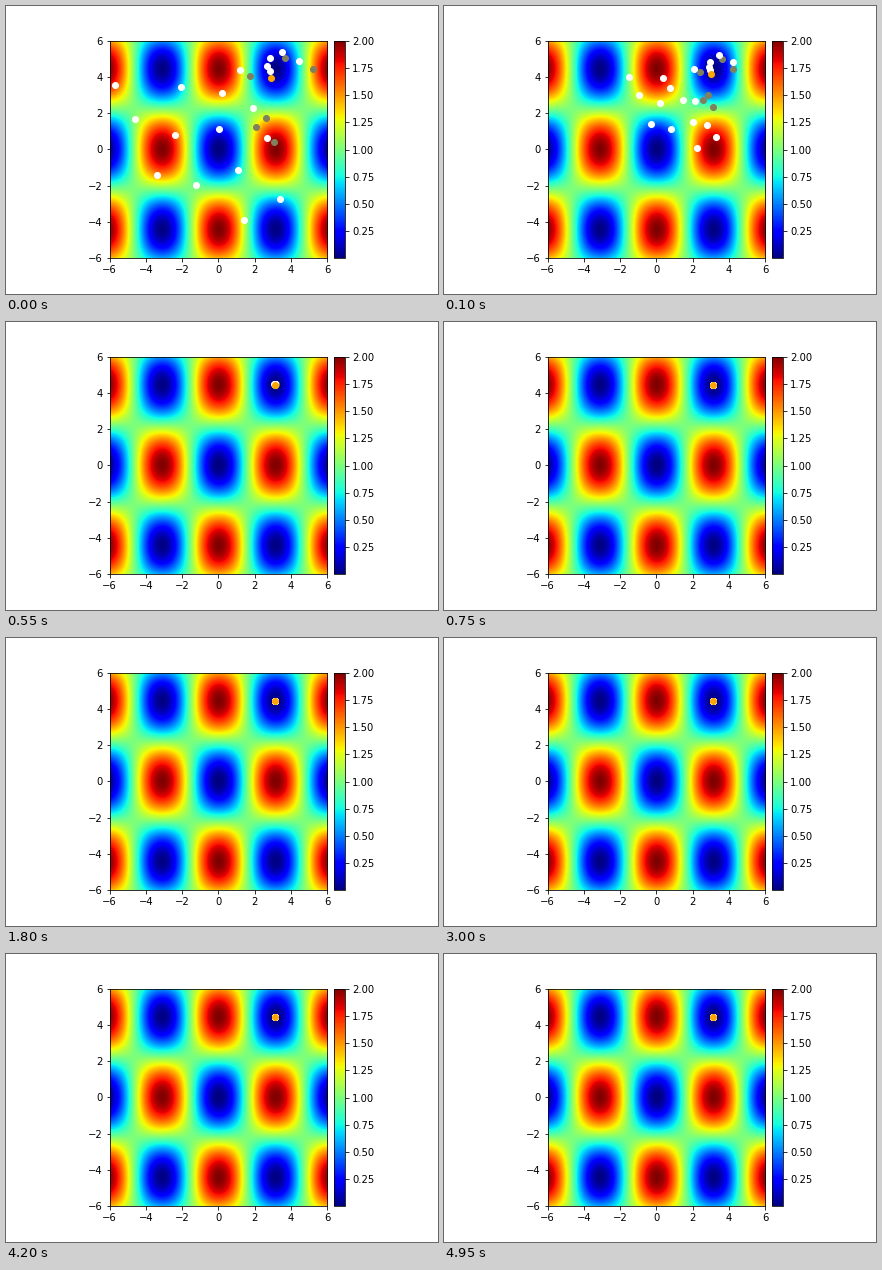
Animation of 432x288 px, one loop 5000 ms. Source, as a matplotlib script:

```python
import numpy as np
import matplotlib.pyplot as plt
from matplotlib.animation import FuncAnimation

W, H, DPI = 432, 288, 72
FRAMES, STEP, SETTLED = 100, 50, 15
SIDE, LEFT, BOTTOM = 217.44, 103.64, 36.0
BAR, GAP = 0.05 * SIDE, 7.2
GOAL = np.array([np.pi, np.pi * np.sqrt(2)])

plt.rcParams.update({"font.family": "DejaVu Sans", "font.size": 10})


def griewank(x, y):
    return 1 + (x**2 + y**2) / 4000 - np.cos(x) * np.cos(y / np.sqrt(2))


def panel(left, width):
    return fig.add_axes([left / W, BOTTOM / H, width / W, SIDE / H])


def polar(r, degrees):
    """Offsets from the goal."""
    a = np.radians(degrees)
    return np.column_stack([r * np.cos(a), r * np.sin(a)])


def spans(n, lingering, slow):
    """Steps each dot takes to close in; a few take longer."""
    s = np.full(n, 2.5)
    s[lingering] = slow
    return s


def agent_starts(n=19, near=5):
    """A tight ring at the goal, then a fan towards the lower left."""
    i = np.arange(n)
    t = i / (n - 1)
    r = 0.33 + 8.5 * t**2 * (3 - 2 * t)
    fan = 180 + 95 * ((0.618 * i - 0.06) % 1)
    return polar(r, np.where(i < near, 215 - 50 * i, fan))


def scout_starts():
    angles = [50, 195, 0, 259, 252, 269]
    return polar(0.8 + 0.65 * np.arange(len(angles)), angles)


fig = plt.figure(figsize=(W / DPI, H / DPI), dpi=DPI, facecolor="white")
ax = panel(LEFT, SIDE)
grid = np.linspace(-6, 6, 200)
field = ax.imshow(griewank(*np.meshgrid(grid, grid)), cmap="jet",
                  origin="lower", extent=(-6, 6, -6, 6), aspect="auto",
                  interpolation="bilinear")
ax.set(xlim=(-6, 6), ylim=(-6, 6),
       xticks=range(-6, 7, 2), yticks=range(-6, 7, 2))
fig.colorbar(field, cax=panel(LEFT + SIDE + GAP, BAR),
             ticks=np.arange(0.25, 2.01, 0.25), format="%.2f")

# start offsets, closing spans, drift off the goal until settled, colour
swarm = [
    (scout_starts(), spans(6, [0], 7), (0, 0), "#80805f"),
    (agent_starts(), spans(19, [3, 4, 6, 7, 8], 4.5), (-0.04, 0.05), "white"),
    (polar(0.57, [243]), spans(1, [], 0), (0, 0), "orange"),
]
layers = [ax.scatter([], [], s=36, c=color, zorder=3 + z)
          for z, (*_, color) in enumerate(swarm)]


def draw(k):
    for dots, (start, span, drift, _) in zip(layers, swarm):
        away = start * np.exp(-(k / span) ** 2)[:, None] + drift
        dots.set_offsets(GOAL + away * (k < SETTLED))
    return layers


anim = FuncAnimation(fig, draw, frames=FRAMES, interval=STEP,
                     init_func=lambda: draw(0), repeat=True, repeat_delay=0)
plt.show()
```
